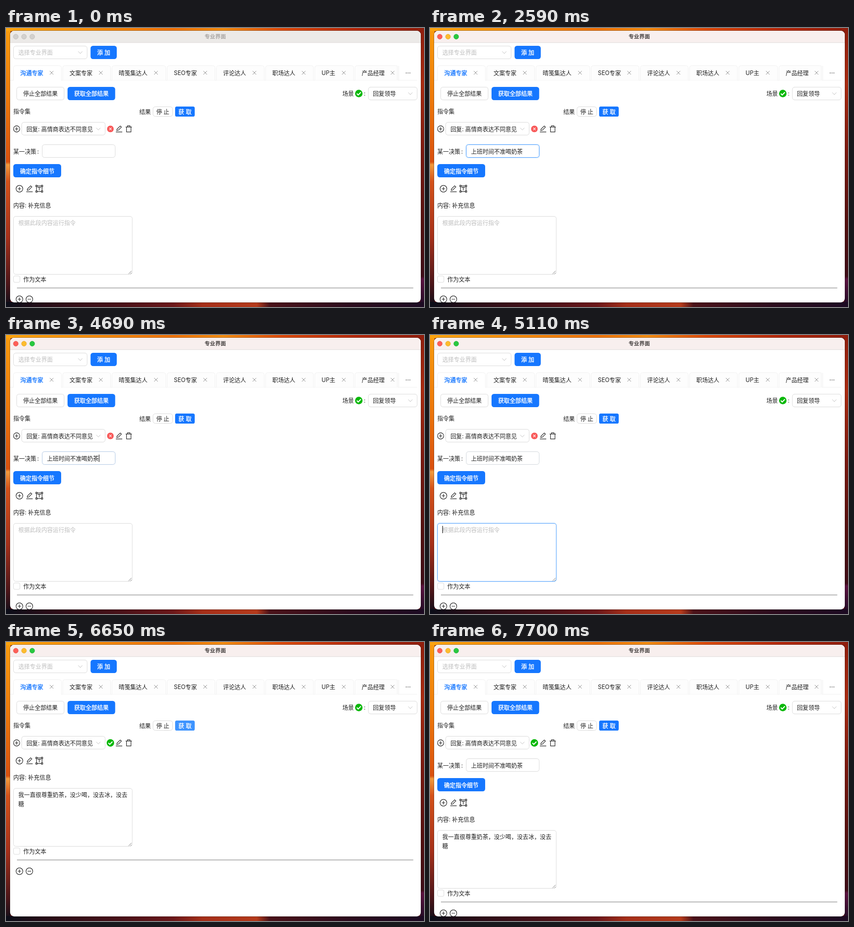
An HTML page that plays this animation: 917x611 px, repeating every 8 s.

```html
<!DOCTYPE html>
<html lang="zh-CN">
<head>
<meta charset="utf-8">
<title>专业界面</title>
<style>
html, body { margin: 0; width: 100%; height: 100%; overflow: hidden; }
body {
  background:
    linear-gradient(90deg, #fba40f, #f58a0a 22%, #ee7208 40%, #f28c12 52%, #dc4a0c 66%, #b3280c 84%, #8f1d0c) 0 0 / 100% 7px no-repeat,
    linear-gradient(90deg, #0b0d18, #260c17 9%, #4a1118 28%, #6b1719 40%, #a52e18 47%, #b53a1b 60%, #4a1219 63%, #2c0b1d 82%, #1c0a22) 0 100% / 100% 11px no-repeat,
    linear-gradient(#f99c0e, #ee7a0b 25%, #d9500e 48%, #f29a3c 49%, #d4521a 55%, #a5301a 75%, #4a1519 92%, #0d0d18) 0 0 / 10px 100% no-repeat,
    linear-gradient(#8f1d0c, #a92a10 20%, #7a180f 45%, #53100f 70%, #3d0c16 89%, #5b1240 90%, #1c0a22) 100% 0 / 8px 100% no-repeat,
    #6b1719;
}
svg { display: block; width: 917px; height: 611px; }
text { font: 12.6px Inter, "Noto Sans CJK SC", "Noto Sans CJK", sans-serif; fill: #1f1f1f; white-space: pre; }
.mid { text-anchor: middle; }
.medium { stroke: currentColor; stroke-width: .4; }
.white { fill: #fff; color: #fff; }
.blue { fill: #1677ff; color: #1677ff; }
.hint { fill: #bfbfbf; }
.box { fill: #fff; stroke: #d9d9d9; }
.primary { fill: #1677ff; }
.tab { fill: #fdfdfd; stroke: #f0f0f0; }
.line { fill: none; stroke: #1f1f1f; stroke-width: 1.2; }
.chevron { fill: none; stroke: #bfbfbf; stroke-width: 1; }
.close { fill: none; stroke: #8c8c8c; stroke-width: 1; }
.ring { fill: none; stroke: #0591ff; stroke-opacity: .1; stroke-width: 2; }
.caret { fill: #111; }
#title { font-size: 11.8px; font-weight: 700; }
</style>
</head>
<body>
<svg id="stage" viewBox="0 0 917 611"></svg>
<script>
const stage = document.getElementById('stage');
const id = name => document.getElementById(name);

const text = (x, y, s, cls = '', extra = '') =>
  `<text x="${x}" y="${y + 4.6}" class="${cls}" ${extra}>${s}</text>`;
const box = (x, y, w, h, cls = 'box', extra = '') =>
  `<rect x="${x + .5}" y="${y + .5}" width="${w - 1}" height="${h - 1}" rx="5" class="${cls}" ${extra}/>`;
const fill = (x, y, w, h, name = '', rx = 5.4) =>
  `<rect x="${x}" y="${y}" width="${w}" height="${h}" rx="${rx}" class="primary" id="${name}"/>`;
const path = (x, y, d, cls = 'line') =>
  `<path transform="translate(${x} ${y})" d="${d}" class="${cls}"/>`;
const dot = (x, y, r, color, extra = '') =>
  `<circle cx="${x}" cy="${y}" r="${r}" fill="${color}" ${extra}/>`;

const cross = r => `M${-r} ${-r}L${r} ${r}M${-r} ${r}L${r} ${-r}`;
const chevron = (x, y) => path(x, y, 'M-4.5-2.3L0 2.5L4.5-2.3', 'chevron');
const ringed = (x, y, r, d) => `<circle cx="${x}" cy="${y}" r="${r}" class="line"/>` + path(x, y, d);
const plus = (x, y, r = 7.4) => ringed(x, y, r, 'M-3.8 0H3.8M0-3.8V3.8');
const minus = (x, y) => ringed(x, y, 7.4, 'M-3.8 0H3.8');
const edit = (x, y) => path(x, y, 'M-5 3.6L-4.3.4L2.6-6.5L5.2-3.9L-1.8 3ZM-7 6.7H7');
const bin = (x, y) => path(x, y, 'M-6.8-4.2H6.8M-2.8-4.2V-6.8H2.8V-4.2M-4.9-4.2V6.7H4.9V-4.2');
const frame = (x, y) => path(x, y,
  'M-7.6-7.6h3v3h-3zM4.6-7.6h3v3h-3zM-7.6 4.6h3v3h-3zM4.6 4.6h3v3h-3z' +
  'M-4.6-6.1H4.6M-4.6 6.1H4.6M-6.1-4.6V4.6M6.1-4.6V4.6M-3-2V-3.2H3V-2M0-3.2V3.6');
const check = (x, y) => dot(x, y, 8.2, '#0ab80a') +
  path(x, y, 'M-4.4 0L-1.3 3.2L4.5-2.8', 'line" style="stroke:#fff;stroke-width:2.2');
const icons = y => plus(29.5, y) + edit(51.5, y) + frame(73, y);

const tabs = [
  [16, 106, '沟通专家'], [124, 106, '文案专家'], [232, 119, '晴笺集达人'], [353, 106, 'SEO专家'],
  [461, 106, '评论达人'], [569, 106, '职场达人'], [677, 86, 'UP主'], [765, 96, '产品经理']
];
const tab = ([x, w, label], i) => {
  const d = `M${x + .5} 114.5V87.5q0-5 5-5H${x + w - 5.5}q5 0 5 5V114.5`;
  return `<path d="${d}" class="tab" ${i ? '' : 'style="fill:#fff"'}/>` +
    text(x + 15.3, 98, label, i ? '' : 'blue medium') +
    path(i < 7 ? x + w - 22 : 848, 98, cross(4), 'close');
};

stage.innerHTML = `
<defs><clipPath id="clip"><rect x="9" y="6" width="901" height="595" rx="9"/></clipPath></defs>
<rect x="8.5" y="5.5" width="902" height="596" rx="9.5" fill="none" stroke="#000" stroke-opacity=".3"/>
<g clip-path="url(#clip)">
  <rect x="9" y="6" width="901" height="595" fill="#fff"/>
  <rect id="bar" x="9" y="6" width="901" height="26"/>
  <path d="M9 32H910" stroke="#dcd8d6"/>
  ${[21.5, 39.5, 57.5].map(x => dot(x, 19, 5.4, '', 'class="light" stroke-width=".8"')).join('')}
  ${text(459, 18, '专业界面', 'mid', 'id="title"')}

  ${box(16, 39, 162.5, 29)}${text(27, 53.5, '选择专业界面', 'hint')}${chevron(163, 53.5)}
  ${fill(185.5, 39, 57.5, 29)}${text(214.3, 53.5, '添 加', 'mid white medium')}

  <path d="M9 114.5H902" stroke="#f0f0f0"/>
  ${tabs.map(tab).join('')}
  <path d="M17 114.5H121" stroke="#fff"/>
  <rect x="858" y="81" width="45" height="33" fill="#fff"/>
  <path d="M858.5 83V114M861.5 83V114" stroke="#ececec"/>
  ${[878, 882, 886].map(x => dot(x, 98.5, .9, '#444')).join('')}

  ${box(23, 129, 105, 29)}${text(75.5, 143.5, '停止全部结果', 'mid')}
  ${fill(135, 129, 104.5, 29)}${text(187.3, 143.5, '获取全部结果', 'mid white medium')}
  ${text(738, 143.5, '场景')}${check(774, 143.5)}${text(785, 143.5, ':')}
  ${box(794.5, 129, 108, 29)}${text(805, 143.5, '回复领导')}${chevron(887, 143.5)}

  ${text(16, 182.5, '指令集')}${text(292.5, 183, '结果')}
  ${box(322, 172, 44, 22)}${text(344, 183, '停 止', 'mid')}
  <rect id="wave" fill="none" stroke="#1677ff"/>
  ${fill(371, 172, 43, 22, 'fetch', 3.6)}${text(392.7, 183, '获 取', 'mid white medium')}

  ${plus(23.3, 221, 6.8)}
  ${box(34, 206, 184, 29)}${text(45, 221, '回复: 高情商表达不同意见')}${chevron(202.5, 221)}
  <g id="bad">${dot(229, 221, 7.3, '#f85a5a')}${path(229, 221, cross(2.6), 'line" style="stroke:#fff')}</g>
  <g id="good">${check(229, 221)}</g>
  ${edit(248, 221)}${bin(269.3, 221)}

  <g id="details">
    ${text(16, 270, '某一决策')}${text(68.5, 270, ':')}
    ${box(78, 254, 163, 31, 'ring', 'id="inputRing"')}
    ${box(79, 255, 161, 29, 'box', 'id="input"')}
    ${text(90, 270, '上班时间不准喝奶茶', '', 'id="reason"')}
    <rect id="inputCaret" class="caret" y="262" width="1.2" height="16"/>
    ${fill(16, 298, 105, 29, 'confirm')}${text(68.5, 313, '确定指令细节', 'mid white medium')}
  </g>

  <g id="content">
    ${icons(352)}
    ${text(16, 388, '内容: 补充信息')}
    ${box(15, 411, 263, 130, 'ring', 'id="areaRing"')}
    ${box(16, 412, 261.5, 128, 'box', 'id="area"')}
    ${text(27, 426.5, '根据此段内容运行指令', 'hint', 'id="hint"')}
    <g id="note">${text(27, 426.5, '我一直很尊重奶茶，没少喝，没去冰，没去')}${text(27, 446.3, '糖')}</g>
    <rect id="areaCaret" class="caret" width="1.2" height="16"/>
    <path d="M269 538.5L275.5 532M273 538.5L275.5 536" stroke="#666" stroke-width=".9"/>
    <rect x="16.5" y="543" width="14" height="14" rx="3" class="box"/>${text(38, 550, '作为文本')}
    <path d="M24 569.3H893.5" stroke="#8a8a8a" stroke-width="1.2"/>
    ${plus(29.5, 594)}${minus(51.3, 594)}
  </g>
</g>`;

const LOOP = 8000, TICK = 70, FADE = 200;
const lights = [...document.querySelectorAll('.light')];
const colors = ['#fe5f57', '#febc2e', '#28c840'];
const show = (name, on) => id(name).style.display = on ? '' : 'none';
const mix = (a, b, p) => `color-mix(in srgb, ${b} ${p * 100}%, ${a})`;
const easeOut = p => Math.sqrt(1 - (1 - p) ** 2);

function focus(name, p) {
  id(name).style.stroke = mix('#d9d9d9', '#4096ff', p);
  id(name + 'Ring').style.opacity = p;
}

function draw(t) {
  const within = (a, b) => t >= a && t < b;
  const ramp = (start, span = FADE) => Math.min(1, Math.max(0, (t - start) / span));

  const active = within(1470, 2940) || t >= 4690;
  id('bar').style.fill = active ? '#f8efee' : '#eceae8';
  id('title').style.fill = active ? '#4a4544' : '#aaa7a5';
  lights.forEach((el, i) => {
    el.style.fill = active ? colors[i] : '#d2d0ce';
    el.style.stroke = active ? mix(colors[i], '#000', .12) : '#bcbab8';
  });

  focus('input', ramp(1420) - ramp(2890) + ramp(4640) - ramp(4920));
  show('reason', t >= 2030);
  show('inputCaret', within(1470, 2590) || within(4690, 4970));
  id('inputCaret').setAttribute('x', t < 2030 ? 90 : 203.6);

  const pasted = t >= 5250;
  focus('area', ramp(4920) - ramp(5790));
  show('hint', !pasted);
  show('note', pasted);
  show('areaCaret', within(4970, 5810));
  id('areaCaret').setAttribute('x', pasted ? 40 : 27);
  id('areaCaret').setAttribute('y', pasted ? 438 : 418);

  id('confirm').style.fill = mix('#1677ff', '#4096ff', t < 5880 ? ramp(5400) : 0);
  const folded = within(5880, 7700);
  show('details', !folded);
  id('content').setAttribute('transform', `translate(0 ${folded ? -92 : 0})`);
  show('bad', t < 5880);
  show('good', t >= 5880);

  const hover = mix('#1677ff', '#4096ff', ramp(6460) - ramp(7080));
  id('fetch').style.fill = mix(hover, '#0958d9', ramp(6700) - ramp(6850));
  const w = 5.4 * easeOut(ramp(6730, 400));
  const wave = { x: 371 - w / 2, y: 172 - w / 2, width: 43 + w, height: 22 + w, rx: 3.6 + w / 2,
    'stroke-width': w, opacity: .2 * (1 - easeOut(ramp(6730, 620))) };
  for (const key in wave) id('wave').setAttribute(key, wave[key]);
}

const start = performance.now();
function loop() {
  const t = (performance.now() - start) % LOOP;
  draw(Math.floor(t / TICK) * TICK);
  requestAnimationFrame(loop);
}
loop();
</script>
</body>
</html>
```
